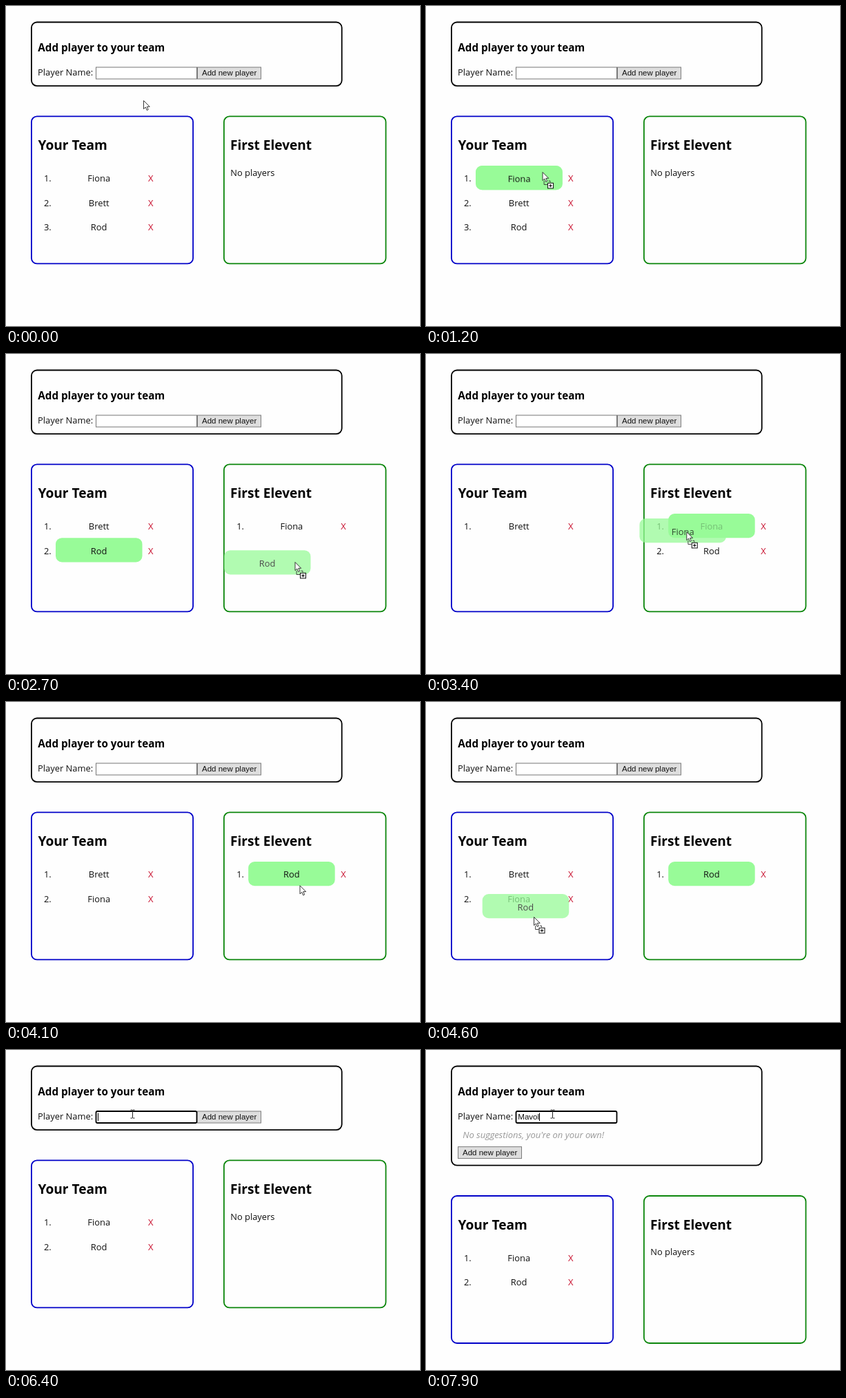
Write an HTML page that moves like this. It is 600x465 px and loops after 8000 ms.

```html
<!DOCTYPE html>
<html lang="en">
<head>
<meta charset="utf-8">
<title>Team picker</title>
<style>
  html, body { margin: 0; width: 100%; height: 100%; overflow: hidden; background: #fefefe; }
  svg { display: block; width: 600px; height: 465px; }
  text { font: 12.9px "Open Sans", "Noto Sans", sans-serif; fill: #111; white-space: pre; }
  .mid { text-anchor: middle; }
  .h2 { font-size: 19.1px; font-weight: 700; fill: #000; }
  .h3 { font-size: 15.2px; font-weight: 700; fill: #000; }
  .ui { font: 11.5px "Liberation Sans", Arial, sans-serif; }
  .x { fill: #c8102e; }
  .hint { font-size: 13px; font-style: italic; fill: #999; }
  .panel { fill: none; stroke-width: 1.8; }
  .hot { fill: #98fb98; }
</style>
</head>
<body>
<svg viewBox="0 0 600 465">
  <rect id="form" class="panel" x="36.9" y="23.5" width="449.8" rx="8" stroke="#000"/>
  <text class="h3" x="46.3" y="66.4">Add player to your team</text>
  <text x="46" y="101">Player Name:</text>
  <rect id="field" x="130.5" y="89" width="146" height="17" fill="#fff"/>
  <text id="typed" class="ui" x="133.3" y="101.3"></text>
  <path id="caret" stroke="#000"/>
  <text id="hint" class="hint" x="53.3" y="127.5">No suggestions, you're on your own!</text>
  <g id="button">
    <rect x="277.5" y="89" width="92" height="17" fill="#dedede" stroke="#7c7c7c"/>
    <text class="ui" x="284" y="101.3">Add new player</text>
  </g>
  <g id="teams">
    <rect class="panel" x="36.9" y="160.4" width="234.2" height="214" rx="8" stroke="#0000c8"/>
    <rect class="panel" x="315.9" y="160.4" width="234.6" height="214" rx="8" stroke="#0b860b"/>
    <text class="h2" x="46.5" y="209">Your Team</text>
    <text class="h2" x="325" y="209">First Elevent</text>
    <g id="rows"></g>
  </g>
  <g id="ghost" opacity="0.75">
    <rect class="hot" width="125.5" height="35.2" rx="9"/>
    <text class="mid" x="62.7" y="23.5"></text>
  </g>
  <g id="arrow">
    <path d="M.5 .5V12.6L3.3 10 5.2 14.5 7.2 13.6 5.3 9.3H9.2Z" fill="#fff" stroke="#222" stroke-width=".9"/>
    <g id="badge">
      <path d="M2.6 13V18.5H7.5M9 13.2H11.5V15.5" fill="none" stroke="#333" stroke-width=".9"/>
      <rect x="8" y="16.3" width="8" height="7.6" fill="#fff" stroke="#111"/>
      <path d="M9.8 20.1H14.2M12 17.9V22.3" stroke="#111" stroke-width="1.1"/>
    </g>
  </g>
  <g id="hand">
    <path d="M-1.6 9.8V1.2Q-1.6 -.5 0 -.5T1.5 1.2V6Q1.6 4.6 3 4.7T4.2 6.2Q4.4 5.1 5.7 5.3T6.8 6.8Q8.4 6 8.7 7.9V11.8Q8.6 13.6 7.4 15.2V18H-.3V16.2Q-2.6 13.6 -4.6 10Q-5 8.2 -3.3 8.4Z" fill="#fff" stroke="#222" stroke-width=".9"/>
    <path d="M1.5 6V9M4.2 6.2V9.2M6.8 6.8V9.5" fill="none" stroke="#222" stroke-width=".8"/>
  </g>
  <path id="beam" d="M-3 -6H-.7L0 -5.4L.7 -6H3M0 -5.4V5.4M-3 6H-.7L0 5.4L.7 6H3" fill="none" stroke="#222"/>
</svg>
<script>
const LOOP = 8000, STEP = 100, ROW = 35.2, TOP = 232, GROW = 51.6;
const COLS = [72, 351.2];
const A = "Fiona", B = "Brett", C = "Rod";
const WORD = "Mavol", KEYS = [7000, 7200, 7400, 7500, 7700];
const FOCUS = 6400;

// time, x, y of the pointer
const PATH = [
  [0, 199, 137], [800, 168, 240], [1000, 168, 241], [1200, 168.5, 241],
  [1600, 414, 297], [1700, 418, 299], [2200, 174.5, 284], [2300, 174.5, 284],
  [2700, 418.5, 302], [2900, 420, 302], [3200, 420, 251], [3300, 419, 251],
  [3700, 152, 296], [3800, 150, 297], [4100, 425.5, 266.3], [4200, 425.5, 265],
  [4600, 156, 312], [4700, 152, 314], [5100, 213, 246], [5600, 213, 246],
  [6200, 183.5, 93], [8000, 183.5, 93]
];
// grab time, drop time, player, start column
const DRAGS = [[1000, 1700, A, 0], [2300, 2900, C, 0], [3300, 3800, A, 1], [4200, 4700, C, 1]];
// time, both lists from then on
const LISTS = [
  [0, [A, B, C], []], [1700, [B, C], [A]], [2900, [B], [A, C]],
  [3800, [B, A], [C]], [4700, [B, A, C], []], [5500, [A, C], []]
];

const el = id => document.getElementById(id);
const set = (node, attrs) => { for (const k in attrs) node.setAttribute(k, attrs[k]); };
const show = (node, on) => set(node, { visibility: on ? "visible" : "hidden" });
const move = (node, x, y) => set(node, { transform: `translate(${x} ${y})` });
const text = (x, y, s, cls = "") => `<text class="${cls}" x="${x}" y="${y}">${s}</text>`;

function pointer(t) {
  const i = PATH.findIndex(p => p[0] > t);
  const [t0, x0, y0] = PATH[i - 1], [t1, x1, y1] = PATH[i];
  const u = (t - t0) / (t1 - t0), e = u * u * (3 - 2 * u);
  return [x0 + (x1 - x0) * e, y0 + (y1 - y0) * e];
}

function list(names, col, hot) {
  const x = COLS[col];
  if (!names.length) return text(x - 26, 246.7, "No players");
  return names.map((name, i) => {
    const y = TOP + i * ROW, base = y + 23.4;
    const mark = hot(name, x, y) ? `<rect class="hot" x="${x}" y="${y}" width="125.5" height="${ROW}" rx="9"/>` : "";
    return mark + text(x - 17, base, i + 1 + ".") + text(x + 62.7, base, name, "mid") + text(x + 137.8, base, "X", "mid x");
  }).join("");
}

function draw(t) {
  const [px, py] = pointer(t);
  const drag = DRAGS.find(d => t >= d[0] && t < d[1]);
  const lists = LISTS.filter(l => l[0] <= t).pop();
  const hot = (name, x, y) => drag ? name === drag[2]
    : px >= x && px < x + 125.5 && py >= y && py < y + ROW;
  el("rows").innerHTML = list(lists[1], 0, hot) + list(lists[2], 1, hot);

  show(el("ghost"), drag);
  if (drag) {
    const [start, , name, col] = drag, [gx, gy] = pointer(start);
    const row = lists[col + 1].indexOf(name);
    move(el("ghost"), COLS[col] + px - gx, TOP + row * ROW + py - gy);
    el("ghost").lastElementChild.textContent = name;
  }

  const count = KEYS.filter(k => k <= t).length, open = count > 0, focus = t >= FOCUS;
  set(el("form"), { height: open ? 92.6 + GROW : 92.6 });
  move(el("teams"), 0, open ? GROW : 0);
  move(el("button"), open ? -231 : 0, open ? GROW : 0);
  show(el("hint"), open);
  set(el("field"), { stroke: focus ? "#000" : "#767676", "stroke-width": focus ? 1.8 : 1, rx: focus ? 2 : 0 });
  el("typed").textContent = WORD.slice(0, count);
  const cx = 133.5 + Math.round(count ? el("typed").getComputedTextLength() : 0);
  set(el("caret"), { d: `M${cx} 91.5V103` });
  show(el("caret"), focus && (t < 6800 || open));

  const onX = !drag && px > 204 && px < 216 && py > 240 && py < 258;
  const onField = px > 130 && px < 277 && py > 88 && py < 107;
  const kind = onX ? "hand" : onField ? "beam" : "arrow";
  for (const id of ["arrow", "hand", "beam"]) {
    move(el(id), px, py);
    show(el(id), id === kind);
  }
  show(el("badge"), drag);
}

function tick(now) {
  draw(Math.floor(now % LOOP / STEP) * STEP);
  requestAnimationFrame(tick);
}
draw(0);
requestAnimationFrame(tick);
</script>
</body>
</html>
```
